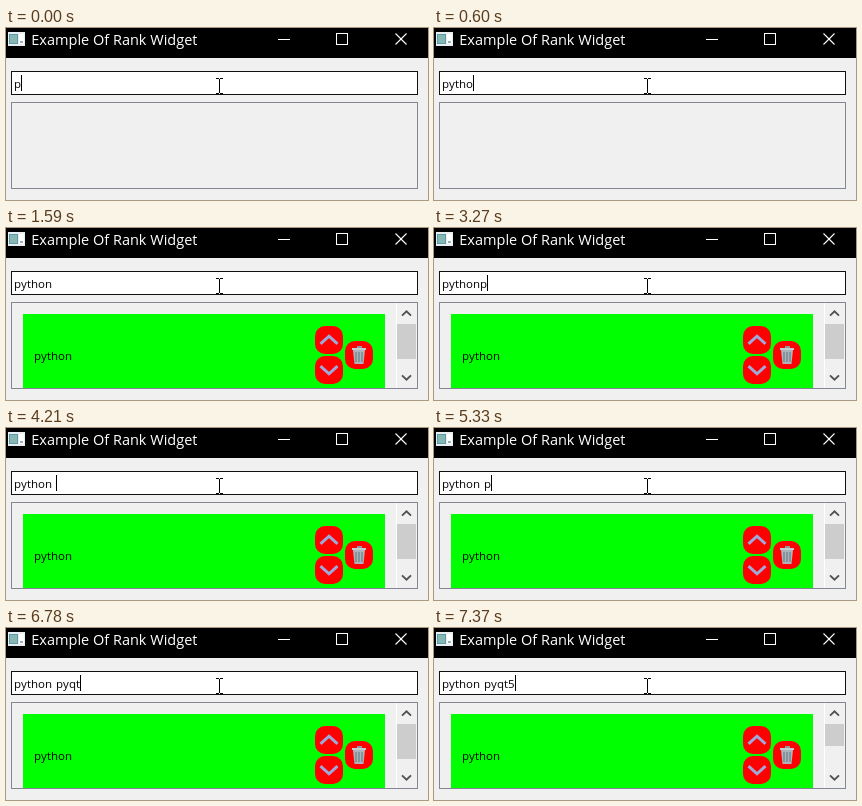
Write an HTML page with a canvas that moves like this. It is 422x172 px and loops after 8 s.

```html
<!DOCTYPE html>
<html lang="en">
<head>
<meta charset="utf-8">
<title>Rank widget</title>
<style>
html, body { margin: 0; width: 100%; height: 100%; overflow: hidden; background: #f0f0f0; }
canvas { display: block; width: 422px; height: 172px; }
</style>
</head>
<body>
<canvas id="stage" width="422" height="172"></canvas>
<script>
const ctx = document.getElementById("stage").getContext("2d", { alpha: false });
const LOOP = 8000;
const ITEM_ADDED = 1590;
const THUMB_SHRINKS = 7370;
const BODY_FONT = '11.5px "Open Sans", "Noto Sans", sans-serif';

// [start ms, text in the field, caret visible]
const typing = [
  [0, "p", true], [130, "py", true], [330, "pyt", true], [530, "pyth", true],
  [600, "pytho", true], [870, "python", true], [1460, "python", false],
  [1660, "python", true], [2190, "python", false], [2730, "python", true],
  [3270, "pythonp", true], [3880, "python", true], [4210, "python ", true],
  [4470, "python p", true], [4670, "python py", true], [5330, "python p", true],
  [5530, "python ", true], [6190, "python p", true], [6320, "python py", true],
  [6580, "python pyq", true], [6780, "python pyqt", true], [6910, "python pyqt5", true]
];

function rect(x, y, w, h, color) {
  ctx.fillStyle = color;
  ctx.fillRect(x, y, w, h);
}

function frame(x, y, w, h, border, fill) {
  rect(x, y, w, h, border);
  rect(x + 1, y + 1, w - 2, h - 2, fill);
}

function line(points, color, width) {
  ctx.beginPath();
  points.forEach(([x, y]) => ctx.lineTo(x, y));
  ctx.strokeStyle = color;
  ctx.lineWidth = width;
  ctx.stroke();
}

// Glyphs sit on whole pixels; returns the pen position after the text.
function label(text, x, y) {
  ctx.font = BODY_FONT;
  ctx.fillStyle = "#000";
  for (const ch of text) {
    ctx.fillText(ch, x, y);
    x += ch === " " ? 4 : Math.round(ctx.measureText(ch).width);
  }
  return x;
}

function chevron(cx, cy, half, rise, color, width) {
  line([[cx - half, cy + rise], [cx, cy - rise], [cx + half, cy + rise]], color, width);
}

function titleBar() {
  rect(0, 0, 422, 30, "#000");
  rect(2, 4, 17, 14, "#e9eef0");
  rect(3, 6, 9, 10, "#5b9aa8");
  rect(4, 7, 7, 8, "#86b8b4");
  rect(13, 6, 5, 10, "#fff");
  rect(14, 13, 3, 2, "#9ab0bd");

  ctx.font = '14.5px "Open Sans", "Noto Sans", sans-serif';
  ctx.fillStyle = "#fff";
  ctx.fillText("Example Of Rank Widget", 25.3, 17);

  rect(272, 11, 12, 1, "#fff");
  frame(330, 5, 12, 12, "#fff", "#000");
  line([[389.5, 5.5], [400.5, 16.5]], "#fff", 1.1);
  line([[400.5, 5.5], [389.5, 16.5]], "#fff", 1.1);
}

function redButton(x, y) {
  ctx.fillStyle = "#f00";
  ctx.beginPath();
  ctx.roundRect(x, y, 28, 28, 10);
  ctx.fill();
}

function trashCan() {
  ctx.fillStyle = "#a9b5ba";
  ctx.beginPath();
  ctx.moveTo(347, 122);
  ctx.lineTo(359, 122);
  ctx.lineTo(357.5, 136);
  ctx.lineTo(348.5, 136);
  ctx.fill();
  for (const x of [349.5, 352.5, 355.5]) rect(x, 124, 1, 10, "#62737b");
  rect(346, 120, 14, 2, "#c3cdd1");
  rect(351, 118, 5, 2, "#8d9ba2");
}

function scrollBar(thumbBottom) {
  rect(390, 75, 1, 85, "#fff");
  rect(391, 96, 19, thumbBottom - 96, "#cdcdcd");
  chevron(400.5, 85.5, 4.5, 2.2, "#505050", 1.8);
  chevron(400.5, 149.5, 4.5, -2.2, "#505050", 1.8);
}

function listItem() {
  rect(17, 86, 362, 74, "#0f0");
  label("python", 28, 132);
  redButton(309, 98);
  redButton(309, 128);
  redButton(339, 113);
  chevron(323, 112, 8.5, 3.8, "#9fa8da", 3);
  chevron(323, 142, 8.5, -3.8, "#9fa8da", 3);
  trashCan();
}

function iBeam() {
  rect(213, 51, 1, 14, "#000");
  for (const y of [50, 65]) {
    rect(210, y, 3, 1, "#000");
    rect(214, y, 3, 1, "#000");
  }
}

function draw(t) {
  rect(0, 0, 422, 172, "#f0f0f0");
  titleBar();

  frame(5, 43, 407, 24, "#111", "#fff");
  const [, text, caret] = typing.findLast(([start]) => start <= t);
  const end = label(text, 8, 60);
  if (caret) rect(end, 47, 1, 16, "#000");

  frame(5, 74, 407, 87, "#828790", "#f0f0f0");
  if (t >= ITEM_ADDED) {
    listItem();
    scrollBar(t >= THUMB_SHRINKS ? 118 : 131);
  }
  iBeam();
}

const began = performance.now();
function tick() {
  draw((performance.now() - began) % LOOP);
  requestAnimationFrame(tick);
}
tick();
</script>
</body>
</html>
```
